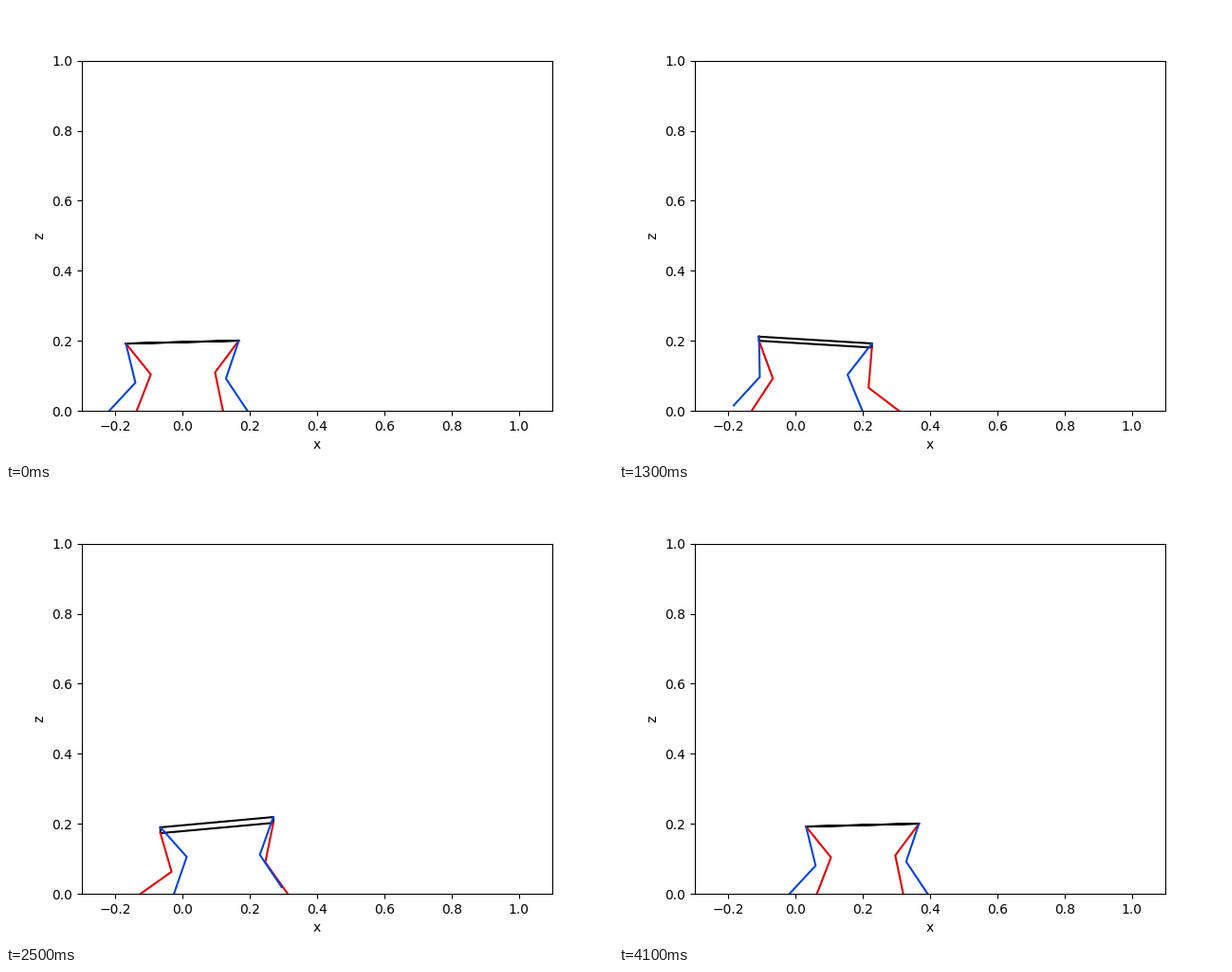
Recreate the animation shown at these times as a matplotlib script. Size 640 px wide and 480 px high, loop 4.2 s.

```python
import numpy as np
import matplotlib.pyplot as plt
from matplotlib.animation import FuncAnimation

FRAMES, INTERVAL = 42, 100
THIGH, SHANK = 0.115, 0.1125
HALF_BODY, HEIGHT = 0.168, 0.1965
STRIDE, SLIP, LIFT = 0.2, 0.018, 0.02

# Legs in swing order, one per quarter of the gait: side, end, first foot x
LEGS = [("red", "front", 0.12), ("blue", "rear", -0.219),
        ("blue", "front", 0.193), ("red", "rear", -0.137)]


def body_pose(p):
    """Centre x, pitch (front minus rear height) and roll at gait phase p."""
    w = 2 * np.pi * p
    x = (-0.001 + STRIDE * p + 0.0068 * np.sin(w)
         - 0.0093 * (1 - np.cos(w)) + 0.002 * (1 - np.cos(2 * w)))
    pitch = 0.004 + 0.031 * np.cos(2 * w - 1.59) + 0.0054 * np.cos(w - 0.3)
    roll = 0.02 * np.sin(w / 2) ** 3
    return x, pitch, roll


def hip_at(side, end, pose):
    x, pitch, roll = pose
    fore = 1 if end == "front" else -1
    up = 1 if side == "blue" else -1
    return np.array([x + fore * HALF_BODY,
                     HEIGHT + fore * pitch / 2 + up * roll / 2])


def foot_at(order, end, x0, p):
    """Slow slip on the ground plus one lifted step in the leg's quarter."""
    u = np.clip(4 * p - order, 0, 1)
    ease = u ** (0.85 if end == "front" else 1.4)
    return np.array([x0 + SLIP * p + (STRIDE - SLIP) * ease,
                     4 * LIFT * u * (1 - u)])


def knee_at(hip, foot, bend):
    """Two-link inverse kinematics; bend is +1 forward, -1 backward."""
    v = foot - hip
    length = np.hypot(*v)
    v = v / length
    d = min(length, THIGH + SHANK)
    a = (THIGH ** 2 - SHANK ** 2 + d * d) / (2 * d)
    off = np.sqrt(max(THIGH ** 2 - a * a, 0))
    return hip + a * v + bend * off * np.array([-v[1], v[0]])


fig, ax = plt.subplots(figsize=(6.4, 4.8), dpi=100)
ax.set(xlim=(-0.3, 1.1), ylim=(0, 1), xlabel="x", ylabel="z")
body_line, = ax.plot([], [], color="black", lw=1.5)
leg_lines = [ax.plot([], [], color="xkcd:" + side, lw=1.5,
                     zorder=4 if side == "blue" else 3)[0]
             for side, _, _ in LEGS]


def update(frame):
    p = frame / (FRAMES - 1)
    pose = body_pose(p)
    corners = [hip_at(side, end, pose)
               for side, end in [("blue", "rear"), ("blue", "front"),
                                 ("red", "front"), ("red", "rear"),
                                 ("blue", "rear")]]
    body_line.set_data(*np.transpose(corners))
    for order, (side, end, x0) in enumerate(LEGS):
        hip = hip_at(side, end, pose)
        foot = foot_at(order, end, x0, p)
        knee = knee_at(hip, foot, 1 if end == "rear" else -1)
        leg_lines[order].set_data(*np.transpose([hip, knee, foot]))
    return [body_line, *leg_lines]


anim = FuncAnimation(fig, update, frames=FRAMES, interval=INTERVAL,
                     repeat=True, repeat_delay=0)
plt.show()
```
